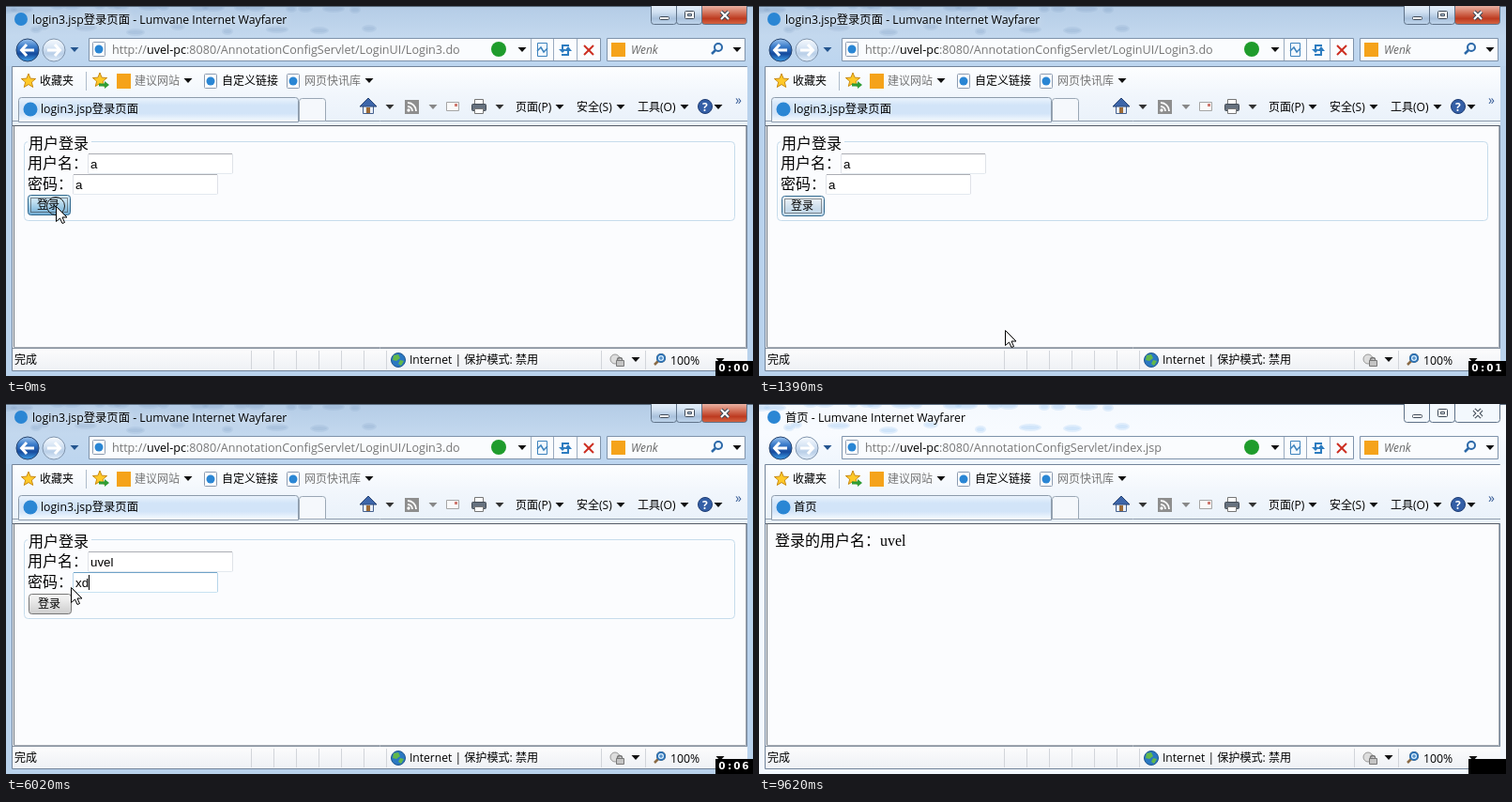
Animation, 796 px wide and 394 px high, one loop 9670 ms. Source, as an HTML page with a canvas:

```html
<!DOCTYPE html>
<html lang="zh">
<meta charset="utf-8">
<title>登录</title>
<style>
html, body { margin: 0; overflow: hidden; background: #b9d1ea; }
canvas { display: block; }
</style>
<canvas id="stage" width="796" height="394"></canvas>
<script>
let c = document.getElementById('stage').getContext('2d');
const LOOP = 9670, USER = 'uvel', BROWSER = 'Lumvane Internet Wayfarer';
const CJK = '"Noto Sans CJK SC", "Noto Sans CJK JP", "Noto Sans CJK", sans-serif';
const UI = '"Open Sans", ' + CJK, ARIAL = '"Liberation Sans", ' + CJK, SERIF = '"Liberation Serif", ' + CJK;
const between = (t, a, b) => t >= a && t < b;

function box(x, y, w, h, fill, stroke, r = 0) {
  c.beginPath();
  c.roundRect(x + .5, y + .5, w, h, r);
  if (fill) { c.fillStyle = fill; c.fill(); }
  if (stroke) { c.strokeStyle = stroke; c.lineWidth = 1; c.stroke(); }
}
function fill(x, y, w, h, color) { c.fillStyle = color; c.fillRect(x, y, w, h); }
function shape(points, color, stroke, width = 1, closed = true) {
  c.beginPath();
  for (let i = 0; i < points.length; i += 2) c.lineTo(points[i], points[i + 1]);
  if (closed) c.closePath();
  if (color) { c.fillStyle = color; c.fill(); }
  if (stroke) { c.strokeStyle = stroke; c.lineWidth = width; c.stroke(); }
}
const line = (color, width, ...points) => shape(points, null, color, width, false);
function disc(x, y, r, color, stroke, width = 1) {
  c.beginPath();
  c.arc(x, y, r, 0, 7);
  if (color) { c.fillStyle = color; c.fill(); }
  if (stroke) { c.strokeStyle = stroke; c.lineWidth = width; c.stroke(); }
}
function text(s, x, y, size = 12, color = '#000', family = UI, style = '') {
  c.font = `${style} ${size}px ${family}`;
  c.fillStyle = color;
  c.fillText(s, x, y);
  return x + c.measureText(s).width;
}
function fade(y0, y1, ...colors) {
  const g = c.createLinearGradient(0, y0, 0, y1);
  colors.forEach((color, i) => g.addColorStop(i / (colors.length - 1), color));
  return g;
}
const layers = {};
function layer(key, paint) {
  if (!layers[key]) {
    const main = c, canvas = document.createElement('canvas');
    canvas.width = 796;
    canvas.height = 394;
    c = canvas.getContext('2d');
    paint();
    c = main;
    layers[key] = canvas;
  }
  c.drawImage(layers[key], 0, 0);
}

const drop = (x, y, color = '#111') => shape([x - 4.5, y - 2, x + 4.5, y - 2, x, y + 3], color);
const badge = (x, y, r) => disc(x, y, r, '#2a86d4');
function pageIcon(x, y) {
  box(x, y, 13, 15, '#fff', '#8c9bb0', 1);
  badge(x + 7, y + 8, 4.5);
}
function star(x, y) {
  const p = [];
  for (let i = 0; i < 10; i++) {
    const r = i % 2 ? 3.5 : 8, a = i * Math.PI / 5;
    p.push(x + r * Math.sin(a), y - r * Math.cos(a));
  }
  shape(p, '#ffc928', '#c98a12');
}
function lens(x, y, color) {
  disc(x, y, 4, '#eef7ff', color, 2);
  line(color, 2.5, x - 3, y + 3, x - 7, y + 7);
}
function cross(x, y, r, dark, light) {
  for (const [color, w] of [[dark, 4], [light, 2]]) {
    line(color, w, x - r, y - r, x + r, y + r);
    line(color, w, x + r, y - r, x - r, y + r);
  }
}

function windowButton(x, w, color) {
  box(x, -1, w, 20, color, '#5f7288', [0, 0, 3, 3]);
}
function glass(active) {
  fill(0, 0, 796, 394, active ? '#b9d2ec' : '#f2f7fd');
  fill(0, 0, 796, 64, active
    ? fade(0, 64, '#b4cce6', '#c3d8ee', '#bcd5ef') : fade(0, 64, '#f5f9fe', '#f8fbff', '#eff6fd'));
  for (let i = 0; i < 26; i++) {
    const x = (i * 83 + 40) % 400, y = i % 3 ? i % 5 : 22 + i % 7;
    for (const grow of [0, 2]) {
      c.beginPath();
      c.ellipse(x, y, 4 + i % 4 * 2 + grow, 2 + grow, 0, 0, 7);
      c.fillStyle = active ? '#7897bf28' : '#a5cdf548';
      c.fill();
    }
  }
  line('#5b6b7d', 1, 0, .5, 796, .5);

  const pale = active ? fade(0, 20, '#e4eef9', '#d0e0f1', '#a9c1dc', '#c2d8ee') : '#f3f8fd';
  windowButton(687, 27, pale);
  windowButton(714, 27, pale);
  windowButton(741, 48, active ? fade(0, 20, '#e9b1a3', '#d5765f', '#bd3a20', '#d86a48') : pale);
  const ink = '#3f4a58';
  box(696, 11, 10, 3, '#fff', ink, 1);
  box(723, 5, 10, 8, '#fff', ink, 1);
  box(726, 8, 4, 2, pale, ink);
  cross(766, 10, 4, ink, active ? '#fff' : '#fafcff');
}

function navigation(home) {
  disc(23, 47, 12, fade(35, 59, '#9cc3ee', '#3c7dcb', '#164b9d', '#3fa0ea'), '#28456f');
  line('#fff', 3, 30, 47, 17, 47);
  line('#fff', 3, 22, 41, 16.5, 47, 22, 53);
  disc(51, 47, 12, fade(35, 59, '#f7fbff', '#dce8f6', '#b9cfe8', '#e5f0fb'), '#8195ad');
  line('#fff', 3, 44, 47, 57, 47);
  line('#fff', 3, 52, 41, 57.5, 47, 52, 53);
  drop(73, 46, '#24558f');

  box(88, 34, 545, 24, '#fafcfe', '#7f93ab');
  pageIcon(92, 38);
  let x = text('http://', 113, 51, 12.6, '#777');
  x = text(USER + '-pc', x, 51, 12.6);
  text(':8080/AnnotationConfigServlet/' + (home ? 'index.jsp' : 'LoginUI/Login3.do'), x, 51, 12.6, '#777');
  disc(525, 46, 8, '#1f9c2c');
  drop(550, 46);
  for (const d of [559, 583, 608]) line('#9aabc0', 1, d + .5, 35, d + .5, 58);
  box(566, 39, 10, 14, '#f2f9ff', '#3e83bd');
  line('#3e83bd', 1.5, 566, 48, 570, 44, 573, 49, 577, 45);
  line('#2c7cc0', 2, 600, 42, 593, 42, 593, 47);
  shape([589, 46, 597, 46, 593, 50], '#2c7cc0');
  line('#2c7cc0', 2, 592, 52, 599, 52, 599, 47);
  shape([595, 48, 603, 48, 599, 43], '#2c7cc0');
  line('#cc2d20', 2, 616, 42, 626, 52);
  line('#cc2d20', 2, 626, 42, 616, 52);

  box(640, 34, 147, 24, '#fafcfe', '#7f93ab');
  fill(645, 39, 15, 15, '#f5a31a');
  text('Wenk', 666, 51, 12, '#666', UI, 'italic');
  lens(759, 44, '#2b68a8');
  drop(779, 46);
}

function toolbars(title) {
  box(6, 64, 783, 324, '#fbfcfe', '#72849a');
  fill(7, 65, 783, 30, fade(65, 95, '#fdfeff', '#f1f6fc'));
  fill(7, 95, 783, 32, fade(95, 127, '#f1f6fc', '#e9f1fa'));
  star(24, 80);
  text('收藏夹', 36, 84);
  line('#aebccb', 1, 85.5, 70, 85.5, 90);
  star(100, 79);
  line('#2f9d35', 3, 99, 84, 107, 84);
  shape([105, 80, 110, 84, 105, 88], '#2f9d35');
  fill(118, 72, 15, 16, '#f5a31a');
  text('建议网站', 137, 84, 12, '#777');
  drop(194, 79);
  pageIcon(211, 72);
  text('自定义链接', 230, 84);
  pageIcon(299, 72);
  text('网页快讯库', 318, 84, 12, '#777');
  drop(387, 79);

  line('#8d9bab', 1, 7, 122.5, 790, 122.5);
  box(13, 97, 298, 26, fade(97, 123, '#edf5fd', '#d2e4f8', '#d2e4f8', '#f7fbff'), '#8d9bab', [3, 3, 0, 0]);
  badge(26, 110, 7.5);
  text(title, 37, 114, 12.3);
  box(312, 98, 28, 24, '#f5f8fc', '#9aa7b5', [3, 3, 0, 0]);

  box(380, 106, 11, 8, '#e9eef7', '#45618f');
  shape([377, 107, 386, 98, 395, 107], '#3d66aa', '#294676');
  fill(384, 108, 4, 6, '#9c6a36');
  fill(425, 100, 15, 15, '#8e8e8e');
  disc(429, 111, 1.7, '#fff');
  for (const r of [5, 9]) {
    c.beginPath();
    c.arc(428, 112, r, -Math.PI / 2, 0);
    c.strokeStyle = '#fff'; c.lineWidth = 1.8; c.stroke();
  }
  box(469, 102, 13, 9, '#fafafa', '#a5a5a5');
  fill(478, 104, 3, 3, '#d07a70');
  box(499, 99, 9, 6, '#fff', '#777');
  box(496, 104, 15, 7, '#66717e', '#424b55', 1);
  box(499, 109, 9, 5, '#fff', '#777');
  [409, 455, 526].forEach((x, i) => drop(x, 107, i === 1 ? '#888' : '#333'));
  [['页面(P)', 543, 590], ['安全(S)', 608, 655], ['工具(O)', 673, 723]].forEach(([s, x, d]) => {
    text(s, x, 112, 12);
    drop(d, 107);
  });
  disc(745, 107, 7.5, '#345fa6', '#1f3d74');
  text('?', 742, 112, 12, '#fff', UI, 'bold');
  drop(759, 107);
  text('»', 777, 105, 14, '#345a94');
}

function statusBar() {
  fill(7, 364, 783, 24, fade(364, 388, '#fdfdfd', '#eef1f5'));
  line('#8793a1', 1, 7, 364.5, 790, 364.5);
  text('完成', 9, 381);
  for (const x of [261, 285, 309, 333, 357, 381, 405, 634, 681]) line('#d2d5da', 1, x + .5, 367, x + .5, 387);
  disc(418, 377, 7.5, '#2b78c2', '#1d568f');
  shape([413, 372, 418, 371, 420, 375, 416, 378, 412, 377], '#62b84a');
  shape([420, 377, 424, 378, 421, 383, 418, 381], '#62b84a');
  text('Internet | 保护模式: 禁用', 430, 381, 12.1);
  disc(649, 376, 5, '#ddd', '#999');
  disc(654, 377, 2.5, null, '#777', 1.5);
  box(650, 377, 8, 6, '#c4c4c4', '#777');
  drop(671, 376);
  lens(698, 375, '#8a6a44');
  disc(698, 375, 4, '#d9efff', '#2d72b5', 2);
  line('#2d72b5', 1, 696, 375, 700, 375);
  line('#2d72b5', 1, 698, 373, 698, 377);
  text('100%', 708, 382, 12.3);
  drop(761, 377);
}
function progressBar(t) {
  box(165, 369, 95, 15, fade(369, 384, '#f5f5f5', '#c9c9c9', '#e2e2e2'), '#a6a6a6', 2);
  const done = Math.min(92, Math.max(10, (t - 7700) / 7.2));
  fill(167, 371, done, 13, fade(371, 384, '#9af0a2', '#2ed13c', '#0dba1d', '#43d950'));
}

function browserWindow(home, active) {
  const title = home ? '首页' : 'login3.jsp登录页面';
  glass(active);
  badge(16, 14, 7);
  c.shadowColor = '#fff';
  c.shadowBlur = 8;
  text(`${title} - ${BROWSER}`, 28, 19, 12.3);
  c.shadowBlur = 0;
  navigation(home);
  toolbars(title);
  box(8, 127, 780, 236, '#fbfcfe', '#a5abb3');
  line('#555c66', 1, 7, 127.5, 789, 127.5);
  line('#6b737d', 1, 8.5, 127, 8.5, 363);
  statusBar();
  if (home) {
    text(USER, text('登录的用户名：', 17, 151, 16, '#000', CJK), 151, 16, '#000', SERIF);
    return;
  }
  box(19, 144, 757, 84, null, '#c6dcec', 4);
  fill(23, 142, 68, 5, '#fbfcfe');
  text('用户登录', 24, 152, 16, '#000', CJK);
  text('用户名：', 23, 173, 16, '#000', CJK);
  text('密码：', 23, 195, 16, '#000', CJK);
}

function pushButton(x, y, w, h, label, state) {
  const tones = {
    normal: ['#f4f4f4', '#ebebeb', '#dcdcdc', '#cfcfcf'],
    focus: ['#f1f6fa', '#dfeaf3', '#c8dbea', '#c4dbee'],
    hot: ['#eaf6fd', '#d9f0fc', '#bee6fd', '#a7d9f5'],
    down: ['#d3e6f3', '#c4e1f2', '#98c7e4', '#75aed4']
  }[state];
  box(x, y, w, h, fade(y, y + h, ...tones), state === 'normal' ? '#777' : '#31698f', 3);
  if (state === 'focus' || state === 'down') {
    c.setLineDash([1, 1]);
    box(x + 3, y + 3, w - 6, h - 6, null, '#333');
    c.setLineDash([]);
  }
  text(label, x + w / 2 - 12.5, y + h / 2 + 4.5, 12);
}
function field(x, y, value, { lit, selected, caret }) {
  const [top, side, bottom] = lit ? ['#6fa3c8', '#b7d5ea', '#c7e2f1'] : ['#abadb3', '#dfe2e8', '#e3e9ef'];
  box(x, y, 154, 21, '#fff', bottom, 1);
  line(side, 1, x + .5, y + 1, x + .5, y + 21);
  line(side, 1, x + 154.5, y + 1, x + 154.5, y + 21);
  line(top, 1, x + 1, y + .5, x + 154, y + .5);
  if (selected) fill(x + 3, y + 3, 7, 16, '#3399ff');
  const end = text(value, x + 3, y + 16, 13.33, selected ? '#fff' : '#000', ARIAL);
  if (caret) fill(Math.round(end), y + 3, 1, 16, '#000');
}
function loginForm(t) {
  const letters = [3060, 3450, 3690, 3960].filter(at => t >= at).length;
  const blink = (t - 5950) % 1060 < 530;
  field(87, 157, letters ? USER.slice(0, letters) : 'a', {
    lit: between(t, 2000, 4800), selected: between(t, 2450, 3060), caret: between(t, 3060, 4680)
  });
  field(71, 179, t < 5630 ? 'a' : t < 5800 ? 'x' : 'xd', {
    lit: between(t, 4300, 7300), selected: between(t, 4900, 5630), caret: between(t, 5630, 7300) && blink
  });
  const down = t < 120 || between(t, 7300, 7430);
  const state = down ? 'down' : t < 1900 || t >= 7430 ? 'focus' : t >= 7040 ? 'hot' : 'normal';
  pushButton(down ? 23 : 24, down ? 201 : 202, 45, 21, '登录', state);
}

function dialog() {
  c.shadowColor = '#000a';
  c.shadowBlur = 9;
  c.shadowOffsetY = 2;
  box(130, 198, 215, 185, fade(198, 384, '#cfdff0', '#b5cee9', '#c5d9ee'), '#2f3a46', 6);
  c.shadowColor = 'transparent';
  box(131, 199, 213, 183, null, '#f2f8ff', 5);
  text('来自网页的消息', 138, 217);
  box(292, 199, 46, 19, fade(199, 219, '#e9b1a3', '#d5765f', '#bd3a20', '#d86a48'), '#5c2720', [0, 0, 3, 3]);
  cross(316, 208.5, 3.5, '#5a3833', '#fff');
  box(137, 228, 201, 148, '#fdfdfd', '#66788c');
  c.lineJoin = 'round';
  shape([178, 264, 192, 289, 164, 289], fade(262, 290, '#ffe873', '#fbc414'), '#b98d18', 2);
  c.lineJoin = 'miter';
  shape([175.5, 271, 180.5, 271, 179, 281, 177, 281], '#222');
  disc(178, 285, 2, '#222');
  text('用户名和密码错误', 203, 277);
  box(242, 334, 85, 27, fade(334, 361, '#f4f4f4', '#ebebeb', '#dcdcdc', '#d0d0d0'), '#3c7fb1', 3);
  box(243, 335, 83, 25, null, '#5fd0f5', 2);
  text('确定', 273, 352);
}

const path = [
  [0, 53, 213], [300, 53, 213], [780, 257, 342], [1000, 257, 342], [1120, 262, 345], [1400, 262, 345],
  [2100, 110, 174], [2360, 110, 174], [2490, 89, 177], [2620, 89, 177], [2760, 84, 178], [3900, 84, 178],
  [4350, 102, 192], [4680, 102, 192], [5070, 70, 193], [5200, 69, 195], [6750, 69, 195],
  [7200, 45, 215], [7700, 45, 215], [7850, 45, 217], [LOOP, 45, 217]
];
function pointer(t) {
  const i = path.findIndex(p => p[0] > t);
  const [t0, x0, y0] = path[i - 1], [t1, x1, y1] = path[i];
  const k = (t - t0) / (t1 - t0);
  const x = Math.round(x0 + (x1 - x0) * k), y = Math.round(y0 + (y1 - y0) * k);
  const clicks = [[0, 120], [1150, 1290], [2360, 2650], [4700, 5200], [7300, 7560]];
  if (clicks.some(([a, b]) => between(t, a, b))) disc(x, y, 9.5, null, '#222');
  if (between(t, 2050, 5200)) {
    line('#000', 1, x + .5, y - 7, x + .5, y + 8);
    for (const dy of [-7.5, 8.5]) {
      line('#000', 1, x - 3, y + dy, x, y + dy);
      line('#000', 1, x + 1, y + dy, x + 4, y + dy);
    }
  } else {
    c.save();
    c.translate(x + .5, y + .5);
    shape([0, 0, 0, 16, 4, 12.5, 6.5, 18, 9, 17, 6.5, 11.5, 11.5, 11.5], '#fff', '#000');
    c.restore();
  }
}

function clock(t) {
  fill(756, 378, 40, 16, '#000');
  if (t >= 9620) return;
  c.textAlign = 'center';
  const s = '0:0' + Math.floor((t + 130) / 1000);
  [763, 771, 779, 788].forEach((x, i) => text(s[i], x, 389, 10.5, '#fff', '"DejaVu Sans", sans-serif', 'bold'));
  c.textAlign = 'left';
}

function draw(t) {
  const home = t >= 7560, asking = between(t, 240, 1390), active = !asking && t < 9620;
  layer(`window ${home} ${active}`, () => browserWindow(home, active));
  if (!home) loginForm(t);
  if (between(t, 7700, 8800)) progressBar(t);
  if (asking) {
    c.globalAlpha = Math.min(1, (t - 180) / 190);
    layer('dialog', dialog);
    c.globalAlpha = 1;
  }
  if (t < 9620) pointer(t);
  clock(t);
}

const bursts = [
  [0, 0, 1], [120, 1120, 9], [1270, 2120, 8], [2360, 2780, 4], [3060, 3180, 2], [3450, 3690, 2], [3960, 4410, 4],
  [4680, 5200, 5], [5630, 6020, 3], [6490, 6490, 1], [6790, 7700, 8], [7850, 8800, 8], [8950, 9220, 3], [9620, 9620, 1]
];
const moments = bursts.flatMap(([first, last, n]) =>
  Array.from({ length: n }, (_, i) => Math.round(first + (last - first) * i / Math.max(1, n - 1))));

const start = performance.now();
let shown = -1;
function tick() {
  const t = Math.max(0, performance.now() - start) % LOOP;
  const moment = moments.findLast(m => m <= t);
  if (moment !== shown) draw(shown = moment);
  requestAnimationFrame(tick);
}
tick();
</script>
</html>
```
